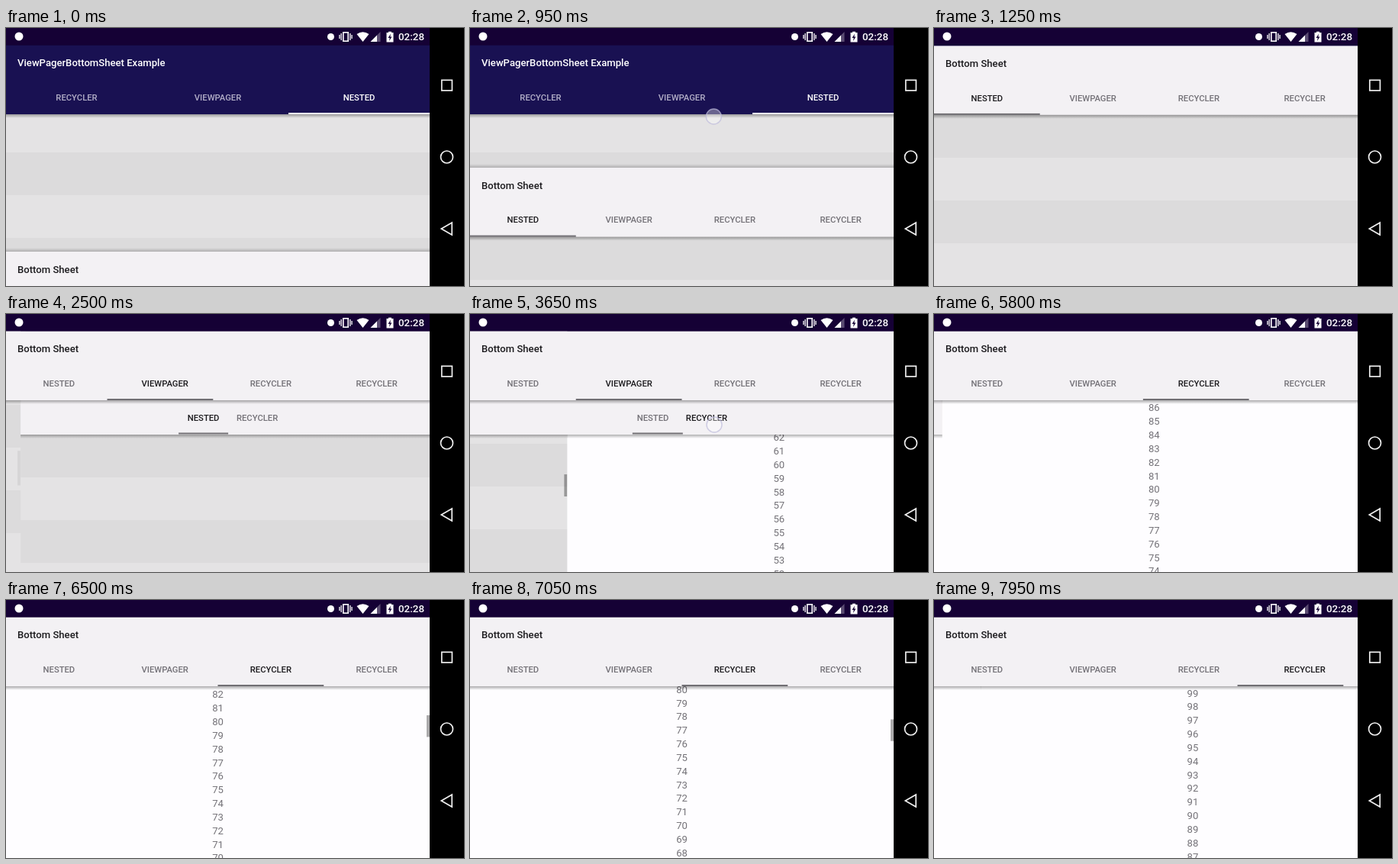
Animation, 600 px wide and 338 px high, one loop 8 s. Source, as an HTML page with a canvas:

```html
<!DOCTYPE html>
<html lang="en">
<head>
<meta charset="utf-8">
<title>Bottom sheet demo</title>
<style>
  html, body { margin: 0; width: 100%; height: 100%; overflow: hidden; background: #000; }
  canvas { display: block; }
</style>
</head>
<body>
<canvas id="stage" width="600" height="338"></canvas>
<script>
const ctx = document.getElementById('stage').getContext('2d');
const LOOP = 8000, WIDTH = 555, HEIGHT = 338;
const STATUS = 22.5, HEADER = 90.5, TABS = 45;
const BAND = 56, BAND_COUNT = 20, ROW = 17.83, ROW_COUNT = 100;

const DARK = { bg: '#191152', title: '#fff', on: '#fff', off: '#b3afc8', line: '#f1eff6' };
const LIGHT = { bg: '#f3f1f4', title: '#1c1b1e', on: '#1c1b1e', off: '#747278', line: '#706e73' };

// ---- timing helpers ----
const ramp = (t, a, b) => Math.min(1, Math.max(0, (t - a) / (b - a)));
const mix = (a, b, u) => a + (b - a) * u;
const easeOut = power => u => 1 - (1 - u) ** power;
const cubic = easeOut(3), quint = easeOut(5);
const smooth = u => u * u * (3 - 2 * u);

// cubic-bezier(.4, 0, .2, 1)
function fastOutSlowIn(x) {
  let lo = 0, hi = 1;
  for (let i = 0; i < 20; i++) {
    const s = (lo + hi) / 2;
    if (1.2 * s * (1 - s) ** 2 + 0.6 * s * s * (1 - s) + s ** 3 < x) lo = s; else hi = s;
  }
  return 3 * lo * lo * (1 - lo) + lo ** 3;
}

// Horizontal swipes: drag by a share of the page, then settle after release.
const SWIPES = [
  { start: 2050, release: 2300, share: 0.55, settle: 500 },
  { start: 5250, release: 5560, share: 0.5, settle: 505 },
  { start: 7600, release: 7773, share: 0.3, settle: 577 }
];
const pagerPosition = t => SWIPES.reduce((sum, s) => sum +
  s.share * ramp(t, s.start, s.release) +
  (1 - s.share) * quint(ramp(t, s.release, s.release + s.settle)), 0);
const selectedPage = t => SWIPES.filter(s => t >= s.release).length;

function sheetTop(t) {
  return t < 1100 ? mix(293, 113, smooth(ramp(t, 750, 1100)))
                  : mix(113, STATUS, quint(ramp(t, 1100, 1350)));
}

const scrollOf = (t, start, end, from, to) => mix(from, to, cubic(ramp(t, start, end)));
const barAlpha = (t, start, fade) => t < start ? 0 : 1 - ramp(t, fade, fade + 250);

// [start, end, x0, y0, x1, y1]
const TOUCHES = [
  [750, 1050, 322, 315, 318, 18],
  [1500, 1750, 325, 274, 320, 16],
  [2050, 2300, 327, 230, 22, 226],
  [3000, 3300, 325, 290, 320, 15],
  [3560, 3660, 320, 145, 320, 145],
  [4200, 4450, 330, 320, 328, 175],
  [5250, 5560, 400, 235, 123, 235],
  [6200, 6450, 330, 240, 328, 150],
  [7600, 7773, 290, 230, 123, 230]
];

// ---- drawing helpers ----
function rect(x, y, w, h, color) {
  ctx.fillStyle = color;
  ctx.fillRect(x, y, w, h);
}

function text(str, x, y, size, color, { align = 'center', weight = 500 } = {}) {
  ctx.font = `${weight} ${size}px Roboto, sans-serif`;
  ctx.textAlign = align;
  ctx.fillStyle = color;
  ctx.fillText(str, x, y);
}

function path(points, color, stroke) {
  ctx.beginPath();
  points.forEach(([x, y]) => ctx.lineTo(x, y));
  ctx.closePath();
  if (stroke) {
    ctx.lineWidth = stroke;
    ctx.strokeStyle = color;
    ctx.stroke();
  } else {
    ctx.fillStyle = color;
    ctx.fill();
  }
}

function circle(x, y, r) {
  ctx.beginPath();
  ctx.arc(x, y, r, 0, 2 * Math.PI);
}

function shadow(x, y, size, strength) {
  const g = ctx.createLinearGradient(0, y, 0, y + size);
  g.addColorStop(0, `rgba(0,0,0,${strength})`);
  g.addColorStop(1, 'rgba(0,0,0,0)');
  rect(x, Math.min(y, y + size), WIDTH, Math.abs(size), g);
}

function scrollbar(x, top, scroll, content, alpha) {
  const view = HEIGHT - 113 - (top > 150 ? TABS : 0);
  rect(x + WIDTH - 4, top + view * scroll / content, 4, view * view / content, `rgba(0,0,0,${0.33 * alpha})`);
}

// ---- screen parts ----
function bands(x, top, scroll) {
  for (let i = 0; i < BAND_COUNT; i++) {
    const y = Math.round(top - scroll + i * BAND);
    if (y > -BAND && y < HEIGHT) rect(x, y, WIDTH, BAND, i % 2 ? '#e4e3e4' : '#dcdbdc');
  }
}

function numbers(x, top, scroll) {
  rect(x, top, WIDTH, HEIGHT, '#fefdff');
  for (let i = 0; i < ROW_COUNT; i++) {
    const y = top + (i + 0.5) * ROW - scroll;
    if (y > top - ROW && y < HEIGHT + ROW) {
      text(ROW_COUNT - 1 - i, x + WIDTH / 2, y + 4.7, 13.125, '#747278', { weight: 400 });
    }
  }
}

function header(top, title, tabs, selected, position, theme) {
  const w = WIDTH / tabs.length;
  rect(0, top, WIDTH, HEADER, theme.bg);
  text(title, 15, top + 27.7, 13.125, theme.title, { align: 'left' });
  tabs.forEach((name, i) =>
    text(name, (i + 0.5) * w, top + 72.3, 11.25, i === selected ? theme.on : theme.off));
  rect(position * w, top + HEADER - 2, w, 2, theme.line);
  shadow(0, top + HEADER, 5, 0.32);
}

function nestedPager(x, top, t) {
  const bodyTop = top + TABS, tap = 3600;
  const inner = quint(ramp(t, tap, tap + 200));
  const nestedX = x - inner * WIDTH, listX = nestedX + WIDTH;

  if (inner < 1) {
    const scroll = scrollOf(t, 3000, 3600, 0, 324);
    bands(nestedX, bodyTop, scroll);
    scrollbar(nestedX, bodyTop, scroll, BAND * BAND_COUNT, barAlpha(t, 3000, 3900));
  }
  if (inner > 0) {
    const scroll = scrollOf(t, 4200, 4900, 665, 924);
    numbers(listX, bodyTop, scroll);
    scrollbar(listX, bodyTop, scroll, ROW * ROW_COUNT, barAlpha(t, 4200, 5100));
  }

  const slide = fastOutSlowIn(ramp(t, tap, tap + 300));
  const onList = t >= tap;
  rect(x, top, WIDTH, TABS, LIGHT.bg);
  text('NESTED', x + 239.5, top + 27, 11.25, onList ? LIGHT.off : LIGHT.on);
  text('RECYCLER', x + 310, top + 27, 11.25, onList ? LIGHT.on : LIGHT.off);
  rect(x + mix(207, 272, slide), top + TABS - 2.5, mix(65, 76, slide), 2, LIGHT.line);
  shadow(x, top + TABS, 5, 0.3);
}

const PAGES = [
  (x, top, t) => {
    const scroll = scrollOf(t, 1500, 2050, 0, 330);
    bands(x, top, scroll);
    scrollbar(x, top, scroll, BAND * BAND_COUNT, barAlpha(t, 1500, 2300));
  },
  nestedPager,
  (x, top, t) => {
    const scroll = scrollOf(t, 6200, 7300, 231, 345);
    numbers(x, top, scroll);
    scrollbar(x, top, scroll, ROW * ROW_COUNT, barAlpha(t, 6200, 7600));
  },
  (x, top) => numbers(x, top, 0)
];

function sheet(t) {
  const top = sheetTop(t), position = pagerPosition(t);
  shadow(0, top, -5, 0.2);
  PAGES.forEach((draw, i) => {
    const offset = i - position;
    if (Math.abs(offset) < 1) draw(offset * WIDTH, top + HEADER, t);
  });
  // The tab indicator trails the pager by one display refresh.
  header(top, 'Bottom Sheet', ['NESTED', 'VIEWPAGER', 'RECYCLER', 'RECYCLER'],
    selectedPage(t), pagerPosition(t - 16), LIGHT);
}

function statusBar() {
  const white = '#fff';
  rect(0, 0, WIDTH, STATUS, '#150135');
  ctx.fillStyle = white;
  circle(17, 11, 5.5);
  ctx.fill();
  circle(425.5, 11.5, 4.5);
  ctx.fill();

  // vibrate
  ctx.lineWidth = 1.6;
  ctx.strokeStyle = white;
  ctx.strokeRect(441.8, 5.8, 6.4, 11.4);
  for (const [x, h] of [[438.5, 9], [450.2, 9], [436.3, 5], [452.4, 5]]) {
    rect(x, 11.5 - h / 2, 1.3, h, white);
  }

  // wifi
  ctx.beginPath();
  ctx.moveTo(467.5, 18);
  ctx.lineTo(459.5, 8);
  ctx.quadraticCurveTo(467.5, 2.5, 475.5, 8);
  ctx.fill();

  // signal
  path([[477.5, 18], [490.5, 18], [490.5, 5]], 'rgba(255,255,255,.3)');
  path([[477.5, 18], [486, 18], [486, 9.5]], white);

  // battery
  rect(498.5, 6, 9, 12.5, white);
  rect(501, 4.7, 4, 2, white);
  path([[504, 7.5], [500.5, 13], [502.7, 13], [502, 17], [505.5, 11.5], [503.3, 11.5]], '#150135');
  text('02:28', 548, 16.3, 13.4, white, { align: 'right' });
}

function navigationBar() {
  rect(WIDTH, 0, 600 - WIDTH, HEIGHT, '#000');
  ctx.lineWidth = 1.7;
  ctx.strokeStyle = '#eee';
  ctx.strokeRect(570.8, 68.3, 13.6, 13.6);
  circle(577.5, 169, 8);
  ctx.stroke();
  path([[570.3, 263], [584.2, 255], [584.2, 271]], '#eee', 1.7);
}

function touches(t) {
  for (const [start, end, x0, y0, x1, y1] of TOUCHES) {
    if (t < start || t >= end) continue;
    const u = ramp(t, start, end);
    circle(mix(x0, x1, u), mix(y0, y1, u), 10);
    ctx.fillStyle = 'rgba(255,255,255,.35)';
    ctx.fill();
    ctx.lineWidth = 1.5;
    ctx.strokeStyle = 'rgba(190,186,220,.7)';
    ctx.stroke();
  }
}

function render(t) {
  if (t < 1350) {
    bands(0, 113, 62);
    header(STATUS, 'ViewPagerBottomSheet Example', ['RECYCLER', 'VIEWPAGER', 'NESTED'], 2, 2, DARK);
  }
  sheet(t);
  statusBar();
  touches(t);
  navigationBar();
}

const began = performance.now();
function tick() {
  render((performance.now() - began) % LOOP);
  requestAnimationFrame(tick);
}
tick();
</script>
</body>
</html>
```
